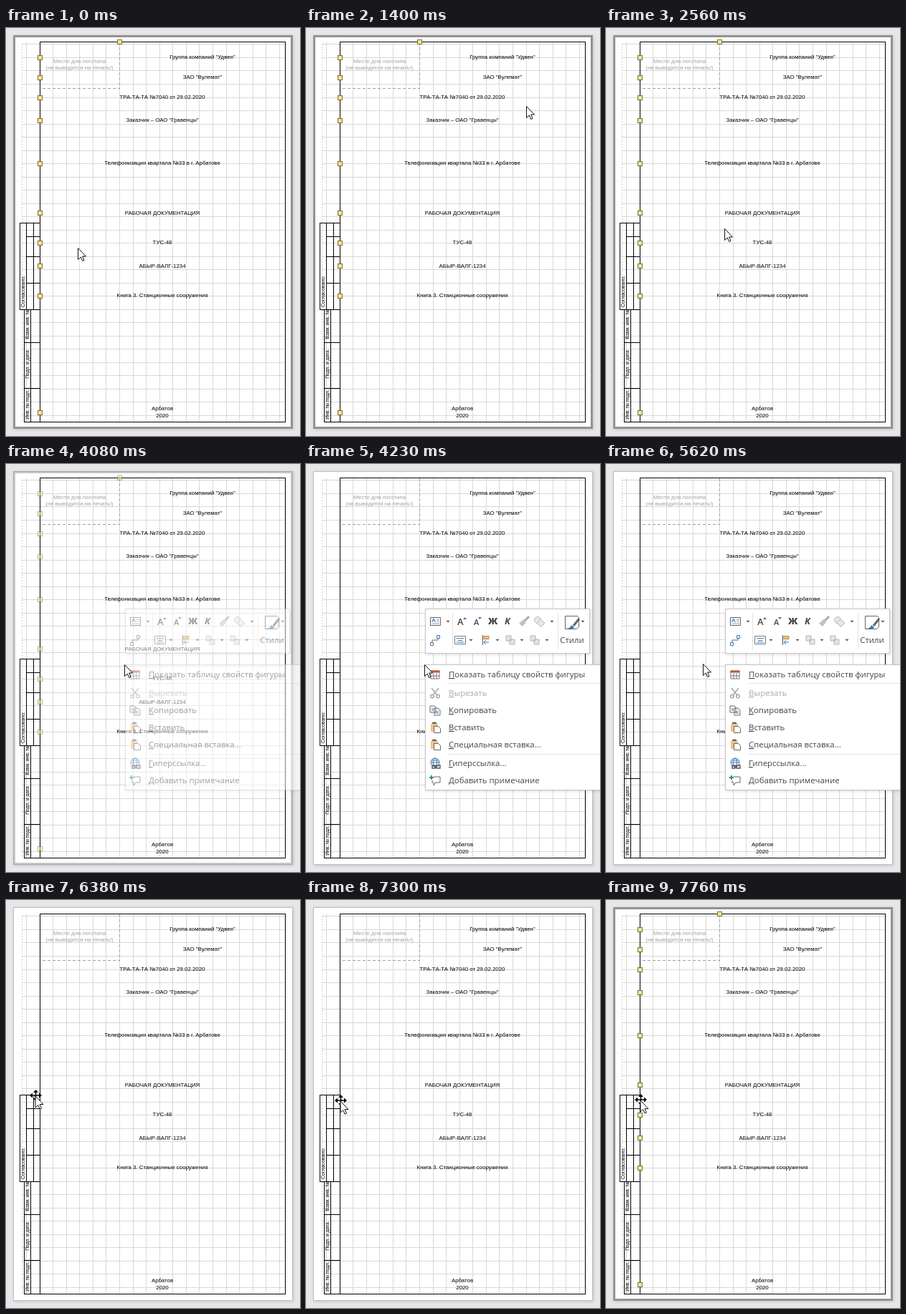
Write an HTML page that moves like this. It is 410x570 px and loops after 8000 ms.

```html
<!DOCTYPE html>
<html lang="ru">
<head>
<meta charset="utf-8">
<style>
  html, body { margin: 0; width: 100%; height: 100%; overflow: hidden; background: #e7e7e7; }
  svg { display: block; width: 410px; height: 570px; }
  .doc { font: 7.85px "Liberation Sans", Arial, sans-serif; text-anchor: middle; }
  .ui { font: 11.4px "Open Sans", "Noto Sans", sans-serif; fill: #444; }
  .crisp { shape-rendering: crispEdges; }
  .first { text-decoration: underline; }
</style>
</head>
<body>
<svg viewBox="0 0 410 570" xmlns="http://www.w3.org/2000/svg">
  <defs>
    <filter id="shadow" x="-10%" y="-10%" width="120%" height="120%">
      <feDropShadow dx="1" dy="1" stdDeviation="2" flood-opacity=".16"/>
    </filter>
    <path id="drop" d="M-2.5-1.2h5L0 1.5z" fill="#555"/>
    <g id="clip">
      <path d="M-6-5h10v11h-10z" fill="#edc47d"/>
      <path d="M-4-5v-2h2q1-2 2 0h2v2z" fill="#666"/>
      <path d="M-1.500-1.500h6l3 3v6h-9z" fill="#fff" stroke="#666"/>
    </g>
    <g id="blocks" fill="#e4e4e4" stroke="#b5b5b5">
      <path d="M-6-6h7v7h-7zM-1-1h7v7h-7z"/>
    </g>
  </defs>

  <rect width="410" height="570" fill="#e7e7e7"/>
  <rect x="10.500" y="10.500" width="389" height="549" fill="#fff" stroke="#bdbdbd" filter="url(#shadow)"/>
  <path id="grid" class="crisp" stroke="#d8d8d8" fill="none"/>
  <path class="crisp" d="M22.500 22V551M22 22.500H390" stroke="#cfcfcf" stroke-dasharray="2 2" fill="none"/>
  <path class="crisp" d="M158.500 20V84.500H48" stroke="#a0a0a0" stroke-dasharray="4 3" fill="none"/>
  <g class="crisp" fill="none" stroke="#000">
    <path d="M47.500 19.500H389.500V550.500H47.500z"/>
    <path d="M47 272.500H19.500V393.500H47M28.500 272V393M38.500 272V393M28 291.500H47M28 319.500H47M28 356.500H47"/>
    <path d="M25.500 393V550.500H47M34.500 393V550M25 439.500H47M25 503.500H47"/>
  </g>
  <g id="labels" class="doc"></g>

  <g id="selection">
    <rect x="11.500" y="11.500" width="387" height="547" fill="none" stroke="#929292" stroke-width="3"/>
    <g id="handles" class="crisp" fill="#ffe683" stroke="#77704c"></g>
  </g>

  <g id="popup" class="ui">
    <g filter="url(#shadow)" fill="#fff" stroke="#c6c6c6">
      <rect x="166.500" y="202.500" width="229" height="62"/>
      <rect x="166.500" y="280.500" width="260" height="175"/>
    </g>
    <rect id="hover" x="168" y="282" width="242" height="24" fill="#cdd2da"/>
    <path class="crisp" d="M199 306.500H410M199 405.500H410M204.500 208V259M351.500 208V259" stroke="#e2e2e2"/>
    <g id="menu"></g>

    <g transform="translate(180 294)" fill="#fff" stroke="#777">
      <path d="M-6-5h12v11h-12zM-6 2h12M-2-2v8M2-2v8"/>
      <path d="M-6.500-4h13" stroke="#c2573f" stroke-width="3"/>
    </g>
    <g transform="translate(180 320)" fill="none" stroke="#a8a8a8" stroke-width="1.500">
      <path d="M-5-7L3 3M5-7L-3 3"/><circle cx="-4" cy="4.500" r="2.300"/><circle cx="4" cy="4.500" r="2.300"/>
    </g>
    <g transform="translate(180 344)" fill="#fff" stroke="#666">
      <path d="M-7-6h6l2 2v7h-8zM-1-3h5l3 3v7h-8z"/>
      <path d="M-5-2h3M-5 0h3M1 2h4M1 4h4" stroke="#3b78b5"/>
    </g>
    <use href="#clip" x="180" y="368"/>
    <use href="#clip" x="180" y="392"/>
    <g transform="translate(180 418)" fill="none" stroke="#3b78b5">
      <circle r="6" cy="-1"/><ellipse rx="2.700" ry="6" cy="-1"/><path d="M-6-1h12M-5-4h10"/>
      <path d="M-4 3h4v4h-4zM2 3h5v4h-5zM-1 5h4" stroke="#555" stroke-width="1.400"/>
    </g>
    <g transform="translate(180 442)" fill="none">
      <path d="M-2-5h9v8h-6l-3 4v-4h-2v-3" stroke="#666"/>
      <path d="M-5-7v6M-8-4h6" stroke="#2f9a67" stroke-width="2"/>
    </g>

    <g transform="translate(180 220)" fill="none" stroke="#666">
      <path d="M-6.500-5.500h14v11h-14z"/><path d="M2-2.500h4M2 0h4M-4 3h10" stroke="#999"/>
      <path d="M-4.500 1l2.500-5 2.500 5M-3.500-1h3" stroke="#3b78b5"/>
    </g>
    <g transform="translate(180 246)" fill="#fff" stroke="#3b78b5">
      <path d="M-4 3v-3h8v-2" fill="none" stroke="#666"/><path d="M-6.500 3.500h4v4h-4zM2.500-6.500h4v4h-4z"/>
    </g>
    <g font-weight="600">
      <text x="211" y="225" font-size="13">A</text><text x="234" y="225" font-size="11">A</text>
      <text x="254" y="224" font-size="13" font-weight="800">Ж</text>
      <text x="277" y="224" font-size="13" font-weight="700" font-style="italic">К</text>
    </g>
    <path d="M219 217l2.500-3 2.500 3zM240 214h5l-2.500 3z" fill="#3b78b5"/>
    <g transform="translate(304 220)">
      <path d="M7-7l-6 6" stroke="#aaa" stroke-width="3"/><path d="M-7 3l6-6 4 4-5 6z" fill="#c2c2c2"/>
    </g>
    <g transform="translate(325 220)" fill="#e8e8e8" stroke="#b5b5b5">
      <circle cx="-2" cy="-2" r="4.500"/><path d="M1 6l-4-4 5-5 6 5-5 5z"/>
    </g>
    <g transform="translate(215 246)" fill="none">
      <path d="M-7.500-5.500h15v11h-15z" stroke="#777"/><path d="M-5-2.500h10M-3 .5h6M-5 3h10" stroke="#3b78b5"/>
    </g>
    <g transform="translate(251 246)">
      <path d="M-4.500-7v14" stroke="#555"/><path d="M-3-5.500h7v4h-7z" fill="#edc47d" stroke="#bd8640"/>
      <path d="M-3 3h7M0 0l-3 3 3 3" fill="none" stroke="#3b78b5"/>
    </g>
    <use href="#blocks" x="285" y="246"/>
    <use href="#blocks" x="319" y="246"/>
    <g transform="translate(371 222)">
      <path d="M-9.500-9.500h17l2 2v13l-3 3h-16z" fill="#fff" stroke="#666"/>
      <path d="M10-6L2 4" stroke="#666" stroke-width="3"/><path d="M-7 8q5-1 6-5l4 3q-3 5-10 2z" fill="#3b78b5"/>
    </g>
    <g id="drops"></g>
    <text x="371" y="250" text-anchor="middle">Стили</text>
  </g>

  <g id="cursor">
    <g id="cross">
      <path d="M-6 0H7M.5-6V7" stroke="#fff" stroke-width="3"/>
      <path d="M-6 0H7M.5-6V7" stroke="#000" stroke-width="1.500"/>
      <path d="M-8 0l4-3.500v7zM9 0l-4-3.500v7zM.5-8l-3.500 4h7zM.5 8l-3.500-4h7z"/>
    </g>
    <path id="arrow" d="M.5.500V16.500L4.200 13 6.700 18.500 9 17.500 6.600 12H11.500z" fill="#fff" stroke="#111"/>
  </g>
</svg>
<script>
const LOOP = 8000;
const el = id => document.getElementById(id);
const show = (id, opacity) => el(id).setAttribute('opacity', opacity);

// Page millimetres run from the lower left corner, one grid cell per 10 mm.
let grid = '';
for (let x = 10 + 18.57; x < 390; x += 18.57) grid += `M${Math.floor(x) + .5} 20V551`;
for (let y = 560 - 18.52; y > 20; y -= 18.52) grid += `M22 ${Math.floor(y) + .5}H390`;
el('grid').setAttribute('d', grid);

const label = (text, x, y, extra = '') => `<text x="${x}" y="${y}" ${extra}>${text}</text>`;
const upright = (text, x, y, size) =>
  label(text, 0, 0, `transform="translate(${x} ${y}) rotate(-90)" font-size="${size}"`);

el('labels').innerHTML = [
  label('Место для логотипа', 102.5, 49, 'fill="#a0a0a0"'),
  label('(не выводится на печать!)', 102.5, 58, 'fill="#a0a0a0"'),
  label('Группа компаний "Удвен"', 274, 43),
  label('ЗАО "Вулемат"', 274, 71),
  ...[
    ['ТРА-ТА-ТА №7040 от 29.02.2020', 99],
    ['Заказчик – ОАО "Гравенцы"', 131],
    ['Телефонизация квартала №33 в г. Арбатове', 191],
    ['РАБОЧАЯ ДОКУМЕНТАЦИЯ', 261],
    ['ТУС-48', 302],
    ['АБЫР-ВАЛГ-1234', 335],
    ['Книга 3. Станционные сооружения', 376],
    ['Арбатов', 534],
    ['2020', 544]
  ].map(([text, y]) => label(text, 218, y)),
  upright('Согласовано:', 26, 368, 7),
  upright('Взам. инв. №', 32, 414, 6.7),
  upright('Подп. и дата', 32, 470, 6.7),
  upright('Инв. № подл.', 32, 526, 6.7)
].join('');

const handle = (x, y) => `<rect x="${x - 2.5}" y="${y - 2.5}" width="6" height="6"/>`;
el('handles').innerHTML = handle(158, 19) +
  [41, 69, 97, 129, 189, 258, 300, 332, 374, 537].map(y => handle(47, y)).join('');

el('menu').innerHTML = [
  ['Показать таблицу свойств фигуры', 298],
  ['Вырезать', 324, 'fill="#ababab"'],
  ['Копировать', 348],
  ['Вставить', 372],
  ['Специальная вставка...', 396],
  ['Гиперссылка...', 422],
  ['Добавить примечание', 446]
].map(([text, y, extra]) =>
  label(`<tspan class="first">${text[0]}</tspan>${text.slice(1)}`, 199, y, extra)).join('');

el('drops').innerHTML = [[198, 220], [343, 220], [386, 220], [230, 246], [267, 246], [301, 246], [336, 246]]
  .map(([x, y]) => `<use href="#drop" x="${x}" y="${y}"/>`).join('');

// The pointer jumps: time, x, y.
const stops = [
  [0, 100, 307], [280, 100, 304], [420, 57, 245], [580, 96, 80], [740, 122, 46],
  [1010, 190, 32], [1130, 267, 69], [1400, 307, 109], [1530, 350, 165], [1660, 375, 225],
  [1780, 374, 277], [1920, 338, 377], [2070, 285, 422], [2190, 215, 397], [2320, 172, 345],
  [2440, 159, 298], [2560, 165, 280], [5010, 171, 286], [5470, 168, 286], [5620, 135, 279],
  [5770, 43, 272], [5920, 40, 273], [6230, 41, 273], [7000, 49, 279], [7300, 48, 280], [7450, 48, 279]
];

function draw(t) {
  const within = (from, to) => t >= from && t < to;
  const [, x, y] = stops.findLast(stop => stop[0] <= t);
  const fading = within(4080, 4230);
  const moving = within(6380, 7000) || t >= 7150;

  show('selection', fading ? .5 : t < 4080 || t >= 7760 ? 1 : 0);
  show('popup', fading ? .5 : within(4230, 6380) ? 1 : 0);
  show('hover', within(5010, 5620) ? 1 : 0);
  show('cross', moving ? 1 : 0);
  el('cursor').setAttribute('transform', `translate(${x} ${y})`);
  el('arrow').setAttribute('transform', moving ? 'translate(-.5 .5)' : '');
}

const start = performance.now();
function tick(now) {
  draw(Math.max(0, now - start) % LOOP);
  requestAnimationFrame(tick);
}
draw(0);
requestAnimationFrame(tick);
</script>
</body>
</html>
```
